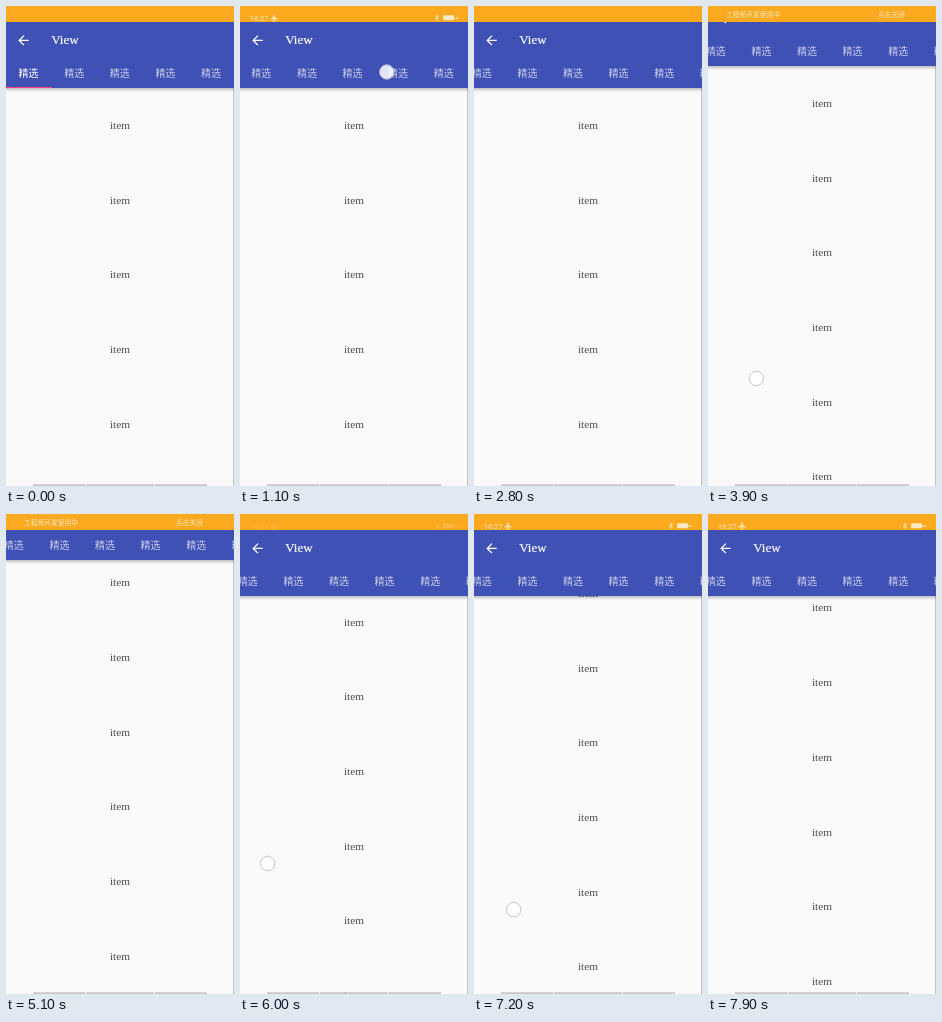
Write an HTML page that moves like this. It is 228x480 px and loops after 8000 ms.

```html
<!DOCTYPE html>
<html lang="zh">
<head>
<meta charset="utf-8">
<title>View</title>
<style>
  html, body { margin: 0; width: 100%; height: 100%; overflow: hidden; background: #fafafa; }
  svg { display: block; width: 100%; height: 100%; }
  .serif { font-family: "Liberation Serif", "Noto Serif", serif; }
  .cjk { font-family: "Noto Sans CJK SC", "Noto Sans CJK", "Noto Sans", sans-serif; }
  .clock { font-family: Roboto, sans-serif; }
</style>
</head>
<body>
<svg viewBox="0 0 228 480" preserveAspectRatio="none">
  <defs>
    <linearGradient id="shade" x1="0" y1="0" x2="0" y2="1">
      <stop offset="0" stop-color="#000" stop-opacity=".24"/>
      <stop offset="1" stop-color="#000" stop-opacity="0"/>
    </linearGradient>
  </defs>
  <rect width="228" height="480" fill="#fafafa"/>
  <g id="list" class="serif" font-size="11.3" fill="#4c4c4c" text-anchor="middle"></g>
  <rect x="227.2" y="16" width=".8" height="464" fill="#b4b4b4"/>
  <g fill="#c6c6c6">
    <rect x="27" y="478.3" width="52.5" height="1.7"/>
    <rect x="80" y="478.3" width="68" height="1.7"/>
    <rect x="148.5" y="478.3" width="52.5" height="1.7"/>
  </g>

  <g id="header">
    <rect y="82" width="228" height="4" fill="url(#shade)"/>
    <rect y="10" width="228" height="72" fill="#3f51b5"/>
    <path transform="translate(9.7 26.6) scale(.65)" fill="#fff"
      d="M20 11H7.83l5.59-5.59L12 4l-8 8 8 8 1.41-1.41L7.83 13H20z"/>
    <text class="serif" x="45.2" y="38.3" font-size="13" fill="#fff" stroke="#fff" stroke-width=".2">View</text>
    <g id="tabs" class="cjk" font-size="10" fill="#fff" text-anchor="middle">
      <rect y="81" width="45.6" height="1" fill="#ff4081"/>
    </g>
  </g>

  <rect width="228" height="16" fill="#fba91f"/>
  <g id="clock" fill="#fff" fill-opacity=".75">
    <text class="clock" x="9.7" y="14.6" font-size="7.6">16:27</text>
    <path d="M34 8.6q.7 0 .7 1v1.5l3 1.8v.8l-3-.9v1.6l.9.6v.6l-1.6-.4-1.6.4v-.6l.9-.6v-1.6l-3 .9v-.8l3-1.8V9.6q0-1 .7-1z"/>
    <path d="M195.2 10.4l3.4 2.9-1.7 1.5V8.9l1.7 1.500-3.400 2.900" fill="none" stroke="#fff" stroke-opacity=".75" stroke-width=".7"/>
    <rect x="203" y="9.3" width="11" height="5" rx="1.2"/>
    <path d="M214.4 11h.8v2h-.8zM216 11.600h2v.8h-2zM216.600 11h.8v2h-.8z"/>
  </g>
  <g id="notice" class="cjk" font-size="6.75" fill="#fff" fill-opacity=".75">
    <text x="18" y="11.4">工程师开发使用中</text>
    <text x="169.8" y="11.4">点击关闭</text>
  </g>
  <circle id="touch" r="7.2" fill="#fff" fill-opacity=".85" stroke="#bcbcdd" stroke-width=".9"/>
</svg>
<script>
const LOOP = 8000, STEP = 100, STATUS_CYCLE = 5900;
const TAB = 45.6, ROW = 74.7;
const BAR = 36;     // height the toolbar can hide
const PEAK = 125.2; // furthest vertical pull
const TURN = 5300;  // when the pull reverses
const $ = id => document.getElementById(id);

function addText(parent, x, y, label, opacity = 1) {
  const el = document.createElementNS("http://www.w3.org/2000/svg", "text");
  el.setAttribute("x", x);
  el.setAttribute("y", y);
  el.setAttribute("fill-opacity", opacity);
  el.textContent = label;
  parent.append(el);
}

for (let i = 0; i < 12; i++) addText($("tabs"), 22.6 + i * TAB, 70.6, "精选", i ? 0.72 : 1);
for (let i = 0; i < 9; i++) addText($("list"), 114, 122.9 + i * ROW, "item");

const clamp = (v, lo, hi) => Math.min(hi, Math.max(lo, v));
const ramp = (t, from, to) => clamp((t - from) / (to - from), 0, 1);
const smooth = x => x * x * (3 - 2 * x);
const easeOut = x => 1 - (1 - x) ** 2;

const tabScroll = t =>
  133.3 * smooth(ramp(t, 700, 1700)) + 109.5 * smooth(ramp(t, 2000, 2800));

// A slow drag and a fling up, then two drags back down.
const pull = t =>
  22 * smooth(ramp(t, 3100, 3900)) + (PEAK - 22) * smooth(ramp(t, 3900, 5100))
  - 49.7 * easeOut(ramp(t, TURN, 6600)) - 50.1 * easeOut(ramp(t, 6600, 7900));

// The toolbar takes up the first part of the pull in either direction.
const collapse = t => clamp(pull(t) - (t < TURN ? 0 : PEAK - BAR), 0, BAR);

// The finger moves with the content it drags; drift is sideways px per ms.
const strokes = [
  { from: 800, to: 1300, x: 190, y: 66, drift: 0 },
  { from: 1900, to: 2000, x: 129, y: 111, drift: 0 },
  { from: 2100, to: 2500, x: 178, y: 66, drift: 0 },
  { from: 3200, to: 4900, x: 62.4, y: 393.5, drift: -0.02 },
  { from: 5400, to: 7300, x: 21.7, y: 317.7, drift: 0.01 }
];

const move = (id, x, y) => $(id).setAttribute("transform", `translate(${x} ${y})`);
const fade = (id, value) => $(id).setAttribute("opacity", value);

function drawTouch(t) {
  const s = strokes.find(s => t >= s.from && t <= s.to);
  fade("touch", s ? 1 : 0);
  if (!s) return;
  move("touch",
    s.x + s.drift * (t - s.from) - tabScroll(t) + tabScroll(s.from),
    s.y - pull(t) + pull(s.from));
}

function draw(t) {
  move("header", 0, -collapse(t));
  move("list", 0, -pull(t));
  move("tabs", -tabScroll(t), 0);
  const u = t % STATUS_CYCLE;
  fade("clock", ramp(u, 0, 500) - ramp(u, 2300, 2700));
  fade("notice", ramp(u, 3100, 3500) - ramp(u, 5300, 5700));
  drawTouch(t);
}

const start = performance.now();
function tick() {
  const t = (performance.now() - start) % LOOP;
  draw(Math.floor(t / STEP) * STEP);
  requestAnimationFrame(tick);
}
tick();
</script>
</body>
</html>
```
